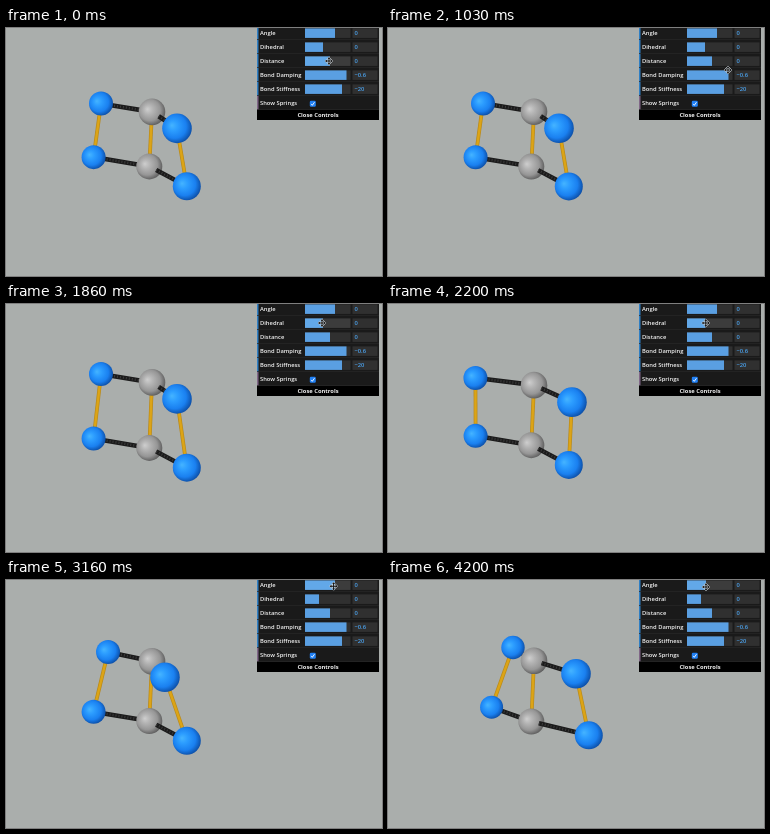
These frames come from a looping animation (376x248 px, 4.23 s). An HTML page with a canvas:

```html
<!DOCTYPE html>
<html lang="en">
<head>
<meta charset="utf-8">
<title>Molecule springs</title>
<style>
html, body { margin: 0; width: 100%; height: 100%; overflow: hidden; background: #aaaeac; }
canvas { display: block; }
</style>
</head>
<body>
<canvas id="stage"></canvas>
<script>
const W = 376, H = 248, LOOP = 4230;
const canvas = document.getElementById('stage');
const dpr = window.devicePixelRatio || 1;
canvas.width = W * dpr;
canvas.height = H * dpr;
canvas.style.width = W + 'px';
canvas.style.height = H + 'px';
const ctx = canvas.getContext('2d');
ctx.scale(dpr, dpr);

// Each key is [time, value, ...]; values ease between keys.
function track(keys, t) {
  const i = keys.findIndex(k => k[0] > t);
  if (i === 0) return keys[0].slice(1);
  if (i < 0) return keys[keys.length - 1].slice(1);
  const a = keys[i - 1], b = keys[i];
  const u = (t - a[0]) / (b[0] - a[0]), s = u * u * (3 - 2 * u);
  return a.slice(1).map((v, j) => v + (b[j + 1] - v) * s);
}

const pointerKeys = [
  [0, 323, 33], [200, 324, 33], [530, 336, 34], [1030, 340, 42], [1100, 340, 40],
  [1600, 333, 32], [1860, 316, 19], [2120, 321, 19], [2320, 312, 19], [2530, 304, 19],
  [2700, 306, 18], [3200, 328, 6], [3600, 331, 8], [3850, 330, 7], [4200, 318, 7]
];
const twistKeys = [
  [1860, 0], [2140, -1.7], [2360, 1.6], [2530, 1], [2700, .8], [2900, 1.1], [3200, 1]
];
const angleKeys = [[3230, 0], [3430, -.35], [3600, .05], [3840, -.35], [4200, 1]];
const dihedralFill = [[1860, 317], [2120, 320], [2320, 313]];
const angleFill = [[3850, 329], [4200, 318]];

function line(a, b, width, color) {
  ctx.lineWidth = width;
  ctx.strokeStyle = color;
  ctx.beginPath();
  ctx.moveTo(a.x, a.y);
  ctx.lineTo(b.x, b.y);
  ctx.stroke();
}

function spring(a, b) {
  line(a, b, 3.8, '#b98a1c');
  line(a, b, 2.4, '#dca416');
}

function bond(a, b) {
  const d = Math.hypot(b.x - a.x, b.y - a.y) || 1;
  const k = Math.min(.6 * a.r / d, .9);
  const start = { x: a.x + (b.x - a.x) * k, y: a.y + (b.y - a.y) * k };
  line(start, b, 4.6, '#1b1b1b');
  ctx.setLineDash([1, 2]);
  line(start, b, 2.4, '#3b3b3b');
  ctx.setLineDash([]);
}

function ball({ x, y, r }, colors) {
  const g = ctx.createRadialGradient(x - r * .35, y - r * .2, 0, x - r * .1, y - r * .1, r * 1.14);
  [0, .3, .7, 1].forEach((stop, i) => g.addColorStop(stop, colors[i]));
  ctx.fillStyle = g;
  ctx.beginPath();
  ctx.arc(x, y, r, 0, 7);
  ctx.fill();
}
const blue = ['#45b4ff', '#2c9dff', '#1a80f0', '#0c4ea6'];
const gray = ['#cecece', '#b4b4b4', '#969696', '#5c5c5c'];

function molecule(t) {
  const s = t / 1000;
  const q = 11.5 * Math.exp(-.8 * s) * Math.cos(12.6 * s + 1.87);
  const [w] = track(twistKeys, t), [a] = track(angleKeys, t);
  const atom = (x, y, r, side) => ({ x, y: y + side * .9 * q, r });
  const tl = atom(95 + 7 * w + 23 * a, 72.4 - w - 4 * a, 12 - .3 * a, -1);
  const bl = atom(87.6 + 16 * a, 132.3 - 5 * a, 12 - .5 * a, 1);
  const gt = atom(146, 80.7, 13.3, -1);
  const gb = atom(143.3, 141.6, 13, 1);
  const tr = atom(171 - 12 * w + 29 * a, 97.2 - .5 * w - 3 * a, 14.8, -1);
  const br = atom(180.8 + 20 * a, 161.4 - 6 * a, 14, 1);

  spring(tl, bl);
  bond(tl, gt);
  bond(bl, gb);
  ball(tl, blue);
  ball(bl, blue);
  spring(gt, gb);
  ball(gt, gray);
  ball(gb, gray);
  bond(gt, tr);
  bond(gb, br);
  spring(tr, br);
  ball(tr, blue);
  ball(br, blue);
}

function rect(x, y, w, h, color) {
  ctx.fillStyle = color;
  ctx.fillRect(x, y, w, h);
}

function text(str, x, y, color, weight = 600) {
  ctx.font = weight + ' 5.8px "Open Sans", "Noto Sans", sans-serif';
  ctx.fillStyle = color;
  ctx.fillText(str, x, y + 2.1);
}

function panel(t, [px, py]) {
  const rows = [
    ['Angle', track(angleFill, t)[0], '0'],
    ['Dihedral', track(dihedralFill, t)[0], '0'],
    ['Distance', 324, '0'],
    ['Bond Damping', 340.5, '−0.6'],
    ['Bond Stiffness', 336, '−20'],
    ['Show Springs']
  ];
  rect(251, 0, 122, 92, '#1a1a1a');
  rows.forEach(([label, end, value], i) => {
    const y = 5 + 14 * i;
    rect(251, y - 7, 1.5, 13.5, value ? '#2f7fc4' : '#806787');
    rect(251, y + 6.5, 122, .5, '#2c2c2c');
    text(label, 254, y, '#f4f4f4');
    if (!value) return;
    const hover = Math.abs(py - y) < 3 && px > 298 && px < 345;
    rect(299, y - 4.6, 45.5, 9.5, hover ? '#3c3c3c' : '#303030');
    rect(299, y - 4.6, end - 299, 9.5, hover ? '#62a8e8' : '#5a9fe2');
    rect(346.5, y - 4.6, 25, 9.5, '#303030');
    text(value, 348.5, y, '#4aa2ee');
  });

  ctx.fillStyle = '#2080f5';
  ctx.beginPath();
  ctx.roundRect(303.8, 72.8, 6, 6, 1.2);
  ctx.fill();
  line({ x: 305.2, y: 75.9 }, { x: 306.4, y: 77.3 }, .9, '#fff');
  line({ x: 306.3, y: 77.3 }, { x: 308.5, y: 74.2 }, .9, '#fff');

  rect(251, 82, 122, 10, '#000');
  ctx.textAlign = 'center';
  text('Close Controls', 312, 87, '#f4f4f4', 700);
  ctx.textAlign = 'left';
}

function pointer([x, y]) {
  const arrows = new Path2D();
  for (const [dx, dy] of [[1, 0], [0, 1], [-1, 0], [0, -1]]) {
    const at = (along, across) => [x + dx * along - dy * across, y + dy * along + dx * across];
    arrows.moveTo(...at(0, .5));
    arrows.lineTo(...at(2.2, .5));
    arrows.lineTo(...at(2.2, 1.5));
    arrows.lineTo(...at(4, 0));
    arrows.lineTo(...at(2.2, -1.5));
    arrows.lineTo(...at(2.2, -.5));
    arrows.lineTo(...at(0, -.5));
    arrows.closePath();
  }
  ctx.lineWidth = 1;
  ctx.strokeStyle = '#dde4ea';
  ctx.stroke(arrows);
  ctx.fillStyle = '#111';
  ctx.fill(arrows);
}

const start = performance.now();
function draw() {
  const t = (performance.now() - start) % LOOP;
  const pos = track(pointerKeys, t);
  rect(0, 0, W, H, '#aaaeac');
  molecule(t);
  panel(t, pos);
  pointer(pos);
  requestAnimationFrame(draw);
}
draw();
</script>
</body>
</html>
```
